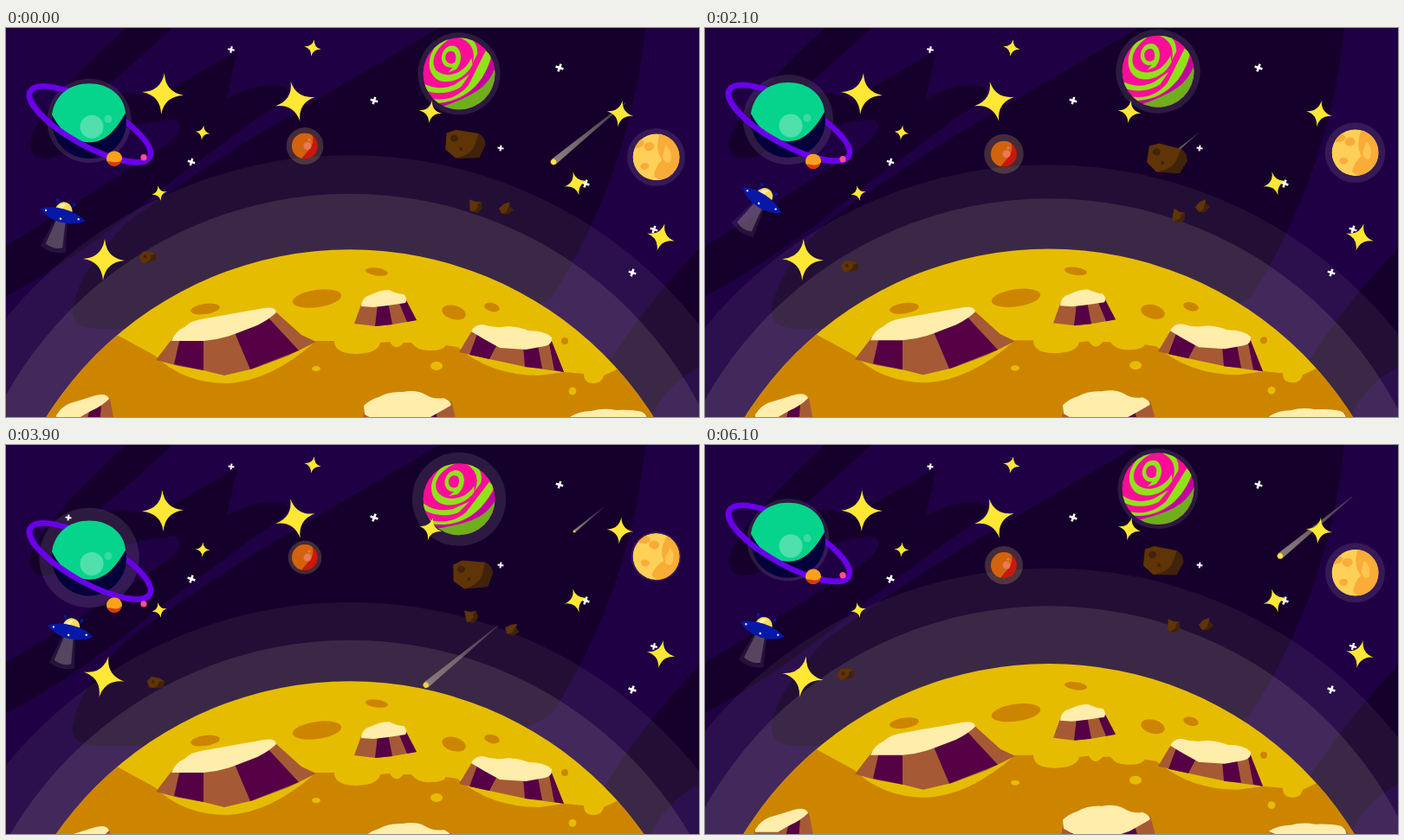
Write an HTML page that moves like this. It is 800 px wide and 450 px high and loops after 6.2 s.

```html
<!DOCTYPE html>
<html lang="en">
<head>
<meta charset="utf-8">
<title>Planets</title>
<style>
html, body { margin: 0; width: 100%; height: 100%; overflow: hidden; background: #1f0044; }
svg { display: block; width: 800px; height: 450px; }
.dark { fill: #15002b; }
.cream { fill: #ffedac; }
.clay { fill: #a55a35; }
.plum { fill: #560045; }
.sun { fill: #e6bc00; }
.soil { fill: #cd8500; }
.halo { fill: #fff; fill-opacity: .1; }
.ring { fill: none; stroke: #6a00ea; stroke-width: 6.5; }
.rock { fill: #5f3406; }
.pit { fill: #41220a; }
.cross { stroke: #fff; stroke-width: 2.6; }
.star { fill: #ffe736; }
</style>
</head>
<body>
<svg viewBox="0 0 800 450">
  <defs>
    <clipPath id="globe"><circle cx="397" cy="670.3" r="414"/></clipPath>
    <clipPath id="pinkDisc"><circle r="41.5"/></clipPath>
    <clipPath id="goldDisc"><circle r="27"/></clipPath>
    <clipPath id="redDisc"><circle r="15"/></clipPath>
    <clipPath id="moonDisc"><circle r="9"/></clipPath>
    <linearGradient id="tail" gradientUnits="userSpaceOnUse" x1="0" x2="1">
      <stop stop-color="#9a8e86" stop-opacity=".9"/>
      <stop offset="1" stop-color="#9a8e86" stop-opacity=".35"/>
    </linearGradient>
  </defs>

  <rect width="800" height="450" fill="#1f0044"/>
  <g class="dark">
    <path d="M138 0H192Q140 48 104 78Q150 70 168 84Q215 55 267 27L255 82Q290 62 322 68Q336 78 290 104L190 178Q80 270 0 310V252Q110 185 186 134Q208 116 196 106Q150 105 60 148Q30 158 27 135Q30 100 138 0Z"/>
    <path d="M500 0H738Q722 165 630 312L560 348H110Q70 348 78 320Q85 280 140 225Q240 152 330 100Z"/>
    <path d="M800 255V392Q760 415 745 450H660Q710 350 800 255Z"/>
  </g>

  <circle id="outer" cx="397" r="513" fill="#fff5dc" fill-opacity=".06"/>
  <circle id="inner" cx="397" r="455" fill="#fff5d2" fill-opacity=".11"/>

  <g id="crosses"></g>
  <g id="comets"></g>

  <g id="saturn">
    <circle class="halo" id="saturnHalo" cx="96" cy="106"/>
    <ellipse class="ring" rx="78.8" ry="25" transform="translate(97 110) rotate(29)"/>
    <circle cx="96" cy="107" r="43" fill="#04003a"/>
    <path d="M53 99C56 76 74 63 96 63S136 76 138 97C126 118 114 131 96 131S64 120 53 99Z" fill="#06d48c"/>
    <circle cx="99" cy="113" r="13.5" fill="#4fe0ac"/>
    <circle cx="118" cy="104" r="4.5" fill="#38dca2"/>
    <path class="ring" d="M-78.8 0A78.8 25 0 0 0 78.8 0" transform="translate(97 110) rotate(29)"/>
    <g id="moon">
      <g clip-path="url(#moonDisc)">
        <circle r="9" fill="#d63a10"/>
        <path d="M-9-9H9V1Q5 5 0 4T-9 3Z" fill="#f9a11f"/>
      </g>
    </g>
    <circle id="dot" cx="159" r="3.6" fill="#ff4f8e"/>
  </g>

  <g id="pink">
    <circle class="halo" id="pinkHalo"/>
    <g clip-path="url(#pinkDisc)">
      <circle r="42" fill="#fb0d98"/>
      <g id="swirl">
        <path d="M-44 10Q-20 32 8 22T44 2V46H-44Z" fill="#c400a0"/>
        <path d="M-44 20Q-15 28 6 28T44 12Q34 44 0 46Q-34 42-44 20Z" fill="#6fae1c"/>
        <g fill="#8fe319">
          <path d="M3-10C-12-8-14-28 2-33C20-35 18-12 0-6L-10-8C8-11 14-27 3-28C-6-28-8-13 3-14Z"/>
          <path d="M14-40C-14-40-24-24-19-14C-12 0 8 2 22-8L19-1C4 9-18 5-25-8C-31-22-20-40 4-44Z"/>
          <path d="M-43-16C-36-2-26 6-10 8L10 7L-6 14C-24 14-38 4-44-6Z"/>
          <path d="M-44 6C-30 20-14 22 2 17L40-6L43 2C28 16 12 24-6 24C-24 24-36 18-44 12Z"/>
          <path d="M22-36Q36-18 20-2L30-8Q40-22 28-36Z"/>
        </g>
      </g>
    </g>
  </g>

  <g id="gold">
    <circle class="halo" id="goldHalo"/>
    <g clip-path="url(#goldDisc)">
      <circle r="27" fill="#ffd058"/>
      <g id="spots" fill="#f9ac38">
        <path d="M10-28Q0-8 8 4Q-2 12-4 22L6 30H30V-28Z"/>
        <path d="M14-12Q22-4 17 8Q10 10 9 0Z" fill="#ffc550"/>
        <ellipse cx="-5" cy="-13" rx="6" ry="5"/>
        <ellipse cx="-18" cy="-18" rx="8" ry="5"/>
        <ellipse cx="-13" cy="9" rx="5" ry="4"/>
      </g>
    </g>
  </g>

  <g id="red">
    <circle id="redHalo" fill="#ffd878" fill-opacity=".2"/>
    <g clip-path="url(#redDisc)">
      <circle r="15" fill="#c9180c"/>
      <path d="M-15-15H8Q12-4 5 4T-4 15H-15Z" fill="#d2630c"/>
    </g>
    <circle cx="3" cy="0" r="4.5" fill="#e8795a"/>
    <circle cx="5" cy="-7" r="1.6" fill="#e8795a"/>
  </g>

  <g id="stars"></g>

  <g id="rockA">
    <path class="rock" d="M-21-13L-10-17L16-13Q24-8 24 0L17 15L-10 16L-22 6Z"/>
    <path class="pit" d="M16-13Q24-8 24 0L17 15L-10 16Q8 12 12 0Z"/>
    <ellipse class="pit" cx="-12" cy="-7" rx="4.5" ry="4"/>
    <circle class="pit" cx="-4" cy="5" r="2"/>
  </g>
  <g id="rockB">
    <path class="rock" d="M-6-8L1-5L7-5L8 3L2 8L-6 5Z"/>
    <path class="pit" d="M7-5L8 3L2 8L-3 6Q5 3 3-2Z"/>
  </g>
  <g id="rockC">
    <path class="rock" d="M-8 0L-2-5L5-7L4-2L9 2L2 7L-5 6Z"/>
    <path class="pit" d="M4-2L9 2L2 7L-3 6Q3 4 2 0Z"/>
  </g>
  <g id="rockD">
    <path class="rock" d="M-10-1L-5-7L4-6L10-3L9 4L1 6L-7 6Z"/>
    <path class="pit" d="M10-3L9 4L1 6L-3 6Q4 4 4-2Z"/>
    <circle class="pit" cx="-3" cy="-1" r="1.8"/>
  </g>

  <g id="ufo">
    <path d="M-7 5H7L15 41Q0 48-15 41Z" fill="#fff" fill-opacity=".07"/>
    <path d="M-5 5H5L10 37Q0 42-10 37Z" fill="#d8cfc4" fill-opacity=".27"/>
    <path d="M-7-8L-10-15M7-8L10-15" stroke="#0a1890" stroke-width="1.5"/>
    <circle cx="-10" cy="-15" r="2" fill="#0a1890"/>
    <circle cx="10" cy="-15" r="2" fill="#0a1890"/>
    <path d="M-10-4A10 11 0 0 1 10-4Z" fill="#ffd95a"/>
    <path d="M-7-6Q-6-13 1-13Q-2-9-2-5Z" fill="#fff0b4"/>
    <path d="M-27 0Q-16-7 0-7T27 0Q16 9 0 9T-27 0Z" fill="#0718a8"/>
    <g fill="#e8e4ff">
      <circle cx="-20" cy="0" r="1.2"/><circle cx="-1" cy="5" r="1.3"/><circle cx="19" cy="0" r="1.2"/>
    </g>
  </g>

  <g id="ground">
    <circle class="sun" cx="397" cy="670.3" r="414"/>
    <g clip-path="url(#globe)">
      <path class="soil" d="M110 344L128 355L172 379Q205 411 255 411Q305 409 358 362H379Q379 377 405 377Q430 376 432 364L443 363Q450 375 459 364L468 364Q475 374 490 373Q505 373 508 367L521 369Q560 402 615 402L645 398L667 400Q667 411 678 411Q688 411 690 402L705 395L760 380V900H0V344Z"/>
      <g class="soil">
        <ellipse rx="17" ry="6" transform="translate(230 325) rotate(-8)"/>
        <ellipse rx="28.5" ry="10" transform="translate(359 313) rotate(-8)"/>
        <ellipse rx="13" ry="4.5" transform="translate(428 282) rotate(8)"/>
        <ellipse rx="14" ry="8" transform="translate(517 329) rotate(15)"/>
        <ellipse rx="9" ry="5" transform="translate(561 323) rotate(15)"/>
        <circle cx="645" cy="362" r="4"/>
      </g>
      <g class="sun">
        <ellipse cx="358" cy="394" rx="5" ry="3"/>
        <ellipse cx="497" cy="391" rx="7" ry="5"/>
        <circle cx="654" cy="420" r="4.4"/>
      </g>

      <path class="clay" d="M193 358L173 384L199 391L228 396L252 402L286 394L326 379L358 363L341 355L311 328Z"/>
      <path class="plum" d="M201 358L194 389L228 396V358ZM263 350L282 395L338 373L300 332Z"/>
      <path class="cream" d="M191 362Q196 350 206 346Q214 338 230 336L298 324Q311 322 312 329Q304 337 290 344L264 354Q246 361 228 362Z"/>

      <path class="clay" d="M410 320L402 342L427 345L446 343L474 338L462 315Z"/>
      <path class="plum" d="M429 319L426 345L446 343L441 317ZM453 316L463 340L474 338L462 315Z"/>
      <path class="cream" d="M410 322Q411 311 420 309Q432 303 442 303Q452 308 459 308Q464 313 461 318L441 321L424 323Z"/>

      <path class="clay" d="M538 350L523 375L558 383L600 392L644 398L629 360Z"/>
      <path class="plum" d="M544 354L535 378L558 383L567 366ZM597 368L599 392L619 394L614 367ZM627 365L633 396L644 398L629 360Z"/>
      <path class="cream" d="M537 351Q541 343 550 343Q566 348 580 345Q594 346 603 350Q622 350 630 358Q631 366 622 368L600 372L570 370L552 360Z"/>

      <path class="clay" d="M60 444L54 460H126L120 429Z"/>
      <path class="plum" d="M96 444L92 460H108L110 436Z"/>
      <path class="cream" d="M58 448Q64 438 74 434Q88 430 100 426Q116 421 119 429Q110 438 98 443L84 451H58Z"/>

      <path class="clay" d="M414 440L408 470H524L514 432Z"/>
      <path class="plum" d="M424 448L420 470H438V450ZM478 448L482 470H504L496 444Z"/>
      <path class="cream" d="M413 437Q420 430 430 427Q442 420 458 421Q474 418 484 424Q494 430 505 428Q516 433 513 437L490 450L470 457H432L414 447Z"/>

      <path class="clay" d="M654 450L645 480H760L738 446Z"/>
      <path class="cream" d="M651 450Q662 443 676 443Q690 439 704 442Q722 441 734 444Q742 448 740 458H690Q670 460 651 450Z"/>
    </g>
  </g>
</svg>

<script>
const LOOP = 6200, STEP = 100, LONG = 6266, MID = LONG / 2, SHORT = LONG / 3;
const $ = id => document.getElementById(id);

function add(parent, tag, attrs) {
  const el = document.createElementNS('http://www.w3.org/2000/svg', tag);
  for (const key in attrs) el.setAttribute(key, attrs[key]);
  return parent.appendChild(el);
}

// Cosine swing around mid that is highest at time peak
const wave = (t, period, peak, mid, amp) =>
  mid + amp * Math.cos((t - peak) / period * 2 * Math.PI);

const place = (el, x, y, turn = 0, size = 1) =>
  el.setAttribute('transform', `translate(${x} ${y}) rotate(${turn}) scale(${size})`);

// x, y, time of largest size
const crosses = [
  [260, 25, 650], [425, 84, 1750], [214, 155, 1700], [639, 46, 100], [571, 139, 900],
  [669, 180, 1900], [748, 233, 300], [723, 283, 1800], [72, 84, 900]
].map(([x, y, peak]) => ({
  x, y, peak,
  el: add($('crosses'), 'path', { class: 'cross', d: 'M0-4.6V4.6M-4.6 0H4.6' })
}));

// x, y, radius, mean tilt, swing, time of largest tilt
const stars = [
  [181, 76, 24, 4, 8, 500], [334, 85, 23.5, 0, 15, 880], [354, 23, 10, 4, 8, 1900],
  [227, 121, 8.5, 4, 8, 300], [177, 191, 9, -4, 8, 900], [113, 268, 24, 1, 15, 1600],
  [490, 97, 13.5, 4, 10, 1700], [709, 99, 15.5, 4, 8, 200], [658, 180, 14, -4, 12, 900],
  [756, 242, 16.5, 2, 14, 50]
].map(([x, y, r, tilt, swing, peak]) => ({
  x, y, r, tilt, swing, peak,
  el: add($('stars'), 'path', {
    class: 'star', d: 'M0-1Q.1-.1 1 0Q.1 .1 0 1Q-.1 .1-1 0Q-.1-.1 0-1Z'
  })
}));

function makeComet() {
  const el = add($('comets'), 'g', {});
  add(el, 'path', { d: 'M0-.035L1-.004V.004L0 .035Z', fill: 'url(#tail)' });
  add(el, 'circle', { r: .03, fill: '#ffe04a' });
  return el;
}
const [big, low, high] = [makeComet(), makeComet(), makeComet()];

function fly(el, x, y, len, alpha = 1) {
  el.setAttribute('opacity', len > 0 ? alpha : 0);
  place(el, x, y, -39.5, Math.max(len, .01));
}

// Tail that grows and shrinks over a half sine
const burst = (p, peak, half, len) =>
  Math.abs(p - peak) < half ? len * Math.cos((p - peak) / half * Math.PI / 2) : 0;

function drawComets(t) {
  const p = t % MID, q = p > 2000 ? p - MID : p;
  const grow = Math.min(1, (q + 388) / 222);
  const fade = Math.max(0, Math.min(1, (950 - q) / 200));
  fly(big, 632 - .192 * q, 155 + .16 * q, grow * 108, fade);
  fly(low, 656 - .196 * (p - 767), 100 + .155 * (p - 767), burst(p, 1170, 885, 58));
  fly(high, 684 - .19 * (p - 1300), 27 + .157 * (p - 1300), burst(p, 1930, 950, 51));
}

function draw(t) {
  const long = (...a) => wave(t, LONG, ...a);
  const mid = (...a) => wave(t, MID, ...a);
  const short = (...a) => wave(t, SHORT, ...a);

  place($('ground'), 0, mid(1033, 6.1, 12.7));
  $('inner').setAttribute('cy', mid(1115, 207, 24.6) + 455);
  $('outer').setAttribute('cy', mid(1180, 165, 25) + 513);

  place($('saturn'), 0, long(4230, 8.8, 16.5));
  $('saturnHalo').setAttribute('r', mid(1200, 53.5, 6.5));
  place($('moon'), 125, mid(1220, 156, 8));
  $('dot').setAttribute('cy', mid(1170, 154, 8));

  place($('pink'), 523, mid(950, 55.4, 7.8));
  $('pinkHalo').setAttribute('r', mid(1120, 50.5, 4.8));
  place($('swirl'), 0, 0, short(1200, -17, 17));

  place($('gold'), 750.5, long(800, 141, 12));
  $('goldHalo').setAttribute('r', mid(2500, 32.3, 3.7));
  place($('spots'), mid(1200, 0, 2), 0, mid(1200, 0, 10));

  place($('red'), 345, mid(2250, 138, 8));
  $('redHalo').setAttribute('r', mid(2400, 21.2, 1.9));

  place($('ufo'), long(4150, 68.5, 6), mid(350, 208.5, 10), mid(2000, 22.5, 11));

  place($('rockA'), mid(1200, 534, 6.3), long(2900, 144.5, 10), mid(767, 1, -5));
  place($('rockB'), long(1500, 541, 6), mid(2250, 208, 10), mid(2250, 0, 12));
  place($('rockC'), long(4450, 578.5, 6.5), mid(850, 209, 4), mid(850, 0, 10));
  place($('rockD'), mid(1200, 168.5, 6.5), long(2950, 271.5, 6.5), mid(1200, 0, 8));

  for (const c of crosses)
    place(c.el, c.x, c.y, short(c.peak, 14, 6), short(c.peak, .88, .14));
  for (const s of stars)
    place(s.el, s.x, s.y, short(s.peak, s.tilt, s.swing), s.r);
  drawComets(t);
}

const start = performance.now();
function tick() {
  const t = performance.now() - start;
  draw(Math.floor(t / STEP) * STEP % LOOP);
  requestAnimationFrame(tick);
}
tick();
</script>
</body>
</html>
```
